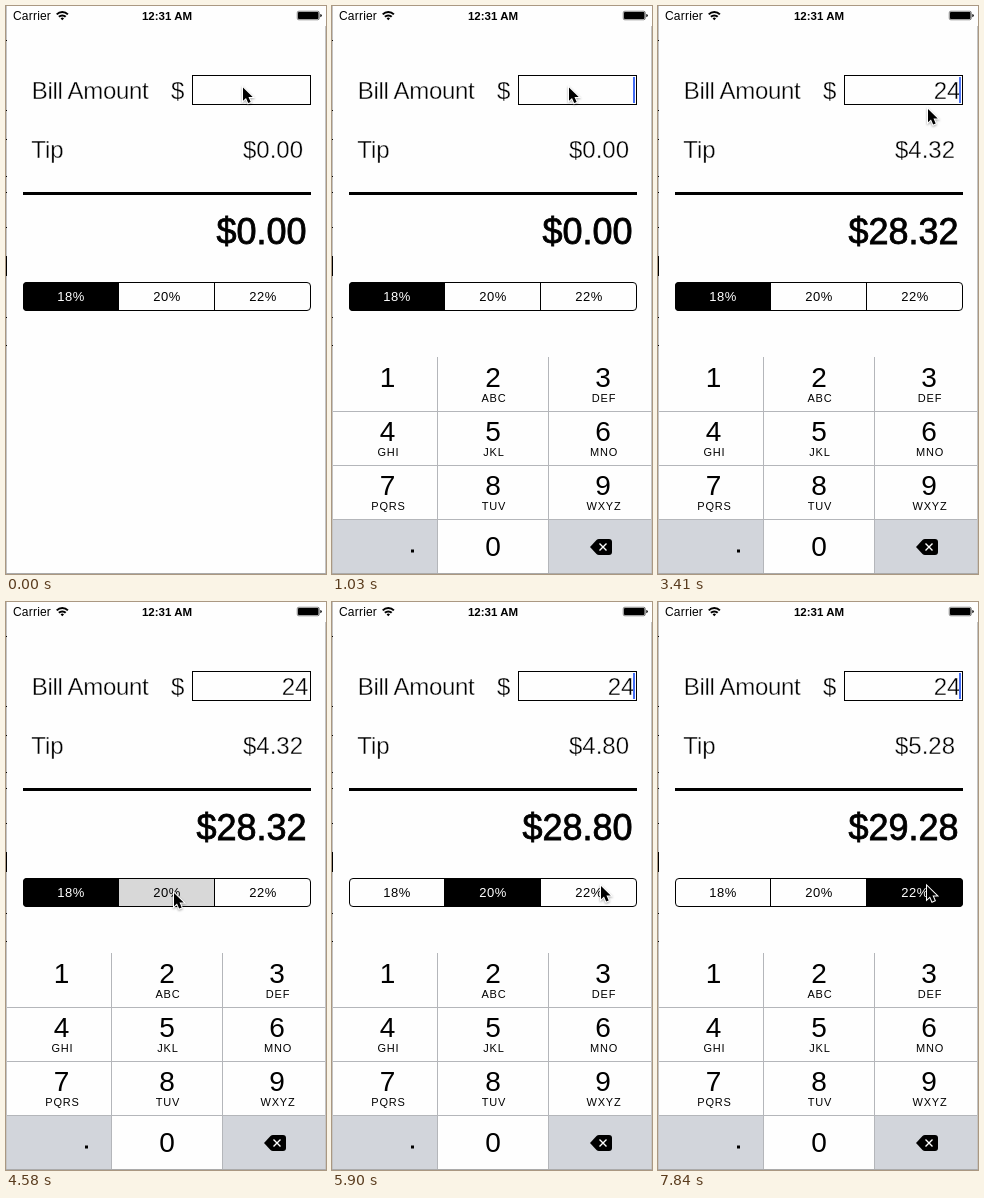
An HTML page that plays this animation: 320 by 568 pixels, repeating every 7.99 s.

```html
<!DOCTYPE html>
<html lang="en">
<head>
<meta charset="utf-8">
<title>Tip calculator</title>
<style>
  html, body { margin: 0; width: 100%; height: 100%; overflow: hidden; background: #fefefe; }
  svg { display: block; width: 100%; height: 100%; }
  text { font-family: "Liberation Sans", Arial, sans-serif; fill: #000; white-space: pre; }
  .end { text-anchor: end; }
  .mid { text-anchor: middle; }
  /* A background-coloured outline thins the strokes to a light weight. */
  .light { font-size: 24px; stroke: #fefefe; stroke-width: .4px; }
  .total { font-size: 36px; stroke: #000; stroke-width: .8px; }
  .segment { font-size: 13px; letter-spacing: .5px; }
  .digit { font-size: 28px; }
  .letters { font-size: 11px; letter-spacing: .8px; }
  .rule { stroke: #b4b6ba; }
  #pointer { filter: drop-shadow(0 1px 1px rgba(0, 0, 0, .35)); }
</style>
</head>
<body>
<svg viewBox="0 0 320 568">
  <rect width="320" height="568" fill="#fefefe"/>

  <text x="7" y="13.500" font-size="12" letter-spacing=".2">Carrier</text>
  <g fill="none" stroke="#000" stroke-width="2">
    <path d="M50.7 8.4a8 8 0 0 1 11.2 0M52.9 10.8a4.8 4.8 0 0 1 6.8 0"/>
    <path d="M56.3 14.2l-1.7-1.8a2.4 2.4 0 0 1 3.4 0z" fill="#000" stroke="none"/>
  </g>
  <text class="mid" x="161" y="13.500" font-size="11.5" font-weight="bold">12:31 AM</text>
  <rect x="291.25" y="5.25" width="22" height="8.500" rx="1.5" fill="none" stroke="#000" stroke-width=".5"/>
  <rect x="292" y="6" width="20.500" height="7" rx=".8"/>
  <path d="M314.3 8v3.2q1.5-.3 1.5-1.6t-1.5-1.6"/>

  <text class="light" x="25.7" y="93" letter-spacing="-.3">Bill Amount</text>
  <text class="light" x="165" y="93">$</text>
  <rect x="186.5" y="69.5" width="118" height="29" fill="none" stroke="#000"/>
  <text class="light end" id="bill" x="302.4" y="92.600"></text>
  <rect id="caret" x="301" y="71" width="2" height="26" fill="#426bf2"/>
  <text class="light" x="25.2" y="152">Tip</text>
  <text class="light end" id="tip" x="297" y="152"></text>
  <rect x="17" y="186" width="288" height="3"/>
  <text class="total end" id="total" x="300.600" y="238"></text>

  <clipPath id="pill"><rect x="17" y="276" width="288" height="29" rx="4"/></clipPath>
  <g id="segments" clip-path="url(#pill)"></g>
  <rect x="17.5" y="276.5" width="287" height="28" rx="3.5" fill="none" stroke="#000"/>
  <path d="M112.5 276v29M208.5 276v29" stroke="#000"/>

  <g id="keyboard">
    <rect x="1" y="351" width="318" height="217" fill="#fefefe"/>
    <path d="M1 514h104v54H1zM217 514h102v54H217z" fill="#d2d5db"/>
    <path class="rule" d="M105.5 351v217M216.5 351v217M1 405.5h318M1 459.5h318M1 513.5h318"/>
    <g id="keys"></g>
    <rect x="79" y="543.500" width="3" height="3"/>
    <path d="M258 541l6.5-7q1-1 2.5-1h10q3 0 3 3v10q0 3-3 3h-10q-1.5 0-2.5-1z"/>
    <path d="M267.5 537.5l7 7m0-7l-7 7" stroke="#fff" stroke-width="1.4"/>
  </g>

  <path d="M.5 0v568M319.5 20v548" stroke="#c4c4c4"/>
  <path d="M0 567.5h320" stroke="#aaa"/>
  <path id="ticks" stroke="#000"/>
  <path id="pointer" d="M0 0V13.2L3 10.4 5.2 15.6 7.7 14.5 5.5 9.4H9.7Z"
        stroke="#fff" stroke-width="2" paint-order="stroke"/>
</svg>
<script>
const LOOP = 7990;
const SAMPLE = LOOP / 54;
const RATES = [18, 20, 22];
const EDGES = [17, 113, 209, 305];

const $ = id => document.getElementById(id);

function add(parent, tag, attrs, content = '') {
  const node = document.createElementNS('http://www.w3.org/2000/svg', tag);
  for (const name in attrs) node.setAttribute(name, attrs[name]);
  node.textContent = content;
  parent.append(node);
  return node;
}

const segments = RATES.map((rate, i) => ({
  box: add($('segments'), 'rect', { x: EDGES[i], y: 276, width: EDGES[i + 1] - EDGES[i], height: 29 }),
  label: add($('segments'), 'text', { class: 'segment mid', x: 65 + 96 * i, y: 295 }, rate + '%')
}));

const columns = [55.5, 161, 271];
['', 'ABC', 'DEF', 'GHI', 'JKL', 'MNO', 'PQRS', 'TUV', 'WXYZ'].forEach((letters, i) => {
  const x = columns[i % 3], y = 380.5 + 54 * Math.floor(i / 3);
  add($('keys'), 'text', { class: 'digit mid', x, y }, i + 1);
  add($('keys'), 'text', { class: 'letters mid', x: x + 1, y: y + 15.5 }, letters);
});
add($('keys'), 'text', { class: 'digit mid', x: 161, y: 550 }, '0');

$('ticks').setAttribute('d',
  [34, 104, 133, 170, 186, 221, 311, 339].map(y => `M0 ${y}.5h1`).join('') + 'M.5 250v20');

const clamp = v => Math.min(1, Math.max(0, v));
const progress = (t, from, to) => clamp((t - from) / (to - from));
const smooth = p => p * p * (3 - 2 * p);

// Each move: start, end, target x, target y
const START = [237, 81.5];
const MOVES = [
  [1080, 1630, 266, 172],
  [1640, 2000, 270, 103],
  [3580, 4320, 168, 291],
  [4800, 5420, 269, 284]
];

function pointerAt(t) {
  let [x, y] = START;
  for (const [from, to, toX, toY] of MOVES) {
    const p = smooth(progress(t, from, to));
    x += (toX - x) * p;
    y += (toY - y) * p;
  }
  return [x, y];
}

function caretOpacity(t) {
  if (t < 575) return 0;
  const phase = (t - (t < 2900 ? 575 : 2930)) % 970;   // typing restarts the blink
  if (phase > 960) return 0;
  return Math.min(clamp(.12 + phase / 60), 1 - progress(phase, 460, 640));
}

const money = value => '$' + value.toFixed(2);

function draw(t) {
  const bill = t < 2750 ? '' : t < 2900 ? '2' : '24';
  const selected = t < 4650 ? 0 : t < 6600 ? 1 : 2;
  const pressed = t > 4500 && t < 4650 ? 1 : t > 6450 && t < 6600 ? 2 : -1;
  const tip = bill * RATES[selected] / 100;

  $('bill').textContent = bill;
  $('tip').textContent = money(tip);
  $('total').textContent = money(+bill + tip);
  $('caret').style.opacity = caretOpacity(t);

  segments.forEach(({ box, label }, i) => {
    box.style.fill = i === selected ? '#000' : i === pressed ? '#d8d8d8' : '#fefefe';
    label.style.fill = i === selected ? '#fff' : '#000';
  });

  const hidden = (1 - progress(t, 540, 1010)) ** 3;
  $('keyboard').setAttribute('transform', `translate(0 ${217 * hidden})`);
  $('pointer').setAttribute('transform', `translate(${pointerAt(t)})`);
}

const begin = performance.now();
function tick() {
  const t = (performance.now() - begin) % LOOP;
  draw(Math.min(53, Math.floor((t + 20) / SAMPLE)) * SAMPLE);
  requestAnimationFrame(tick);
}
tick();
</script>
</body>
</html>
```
